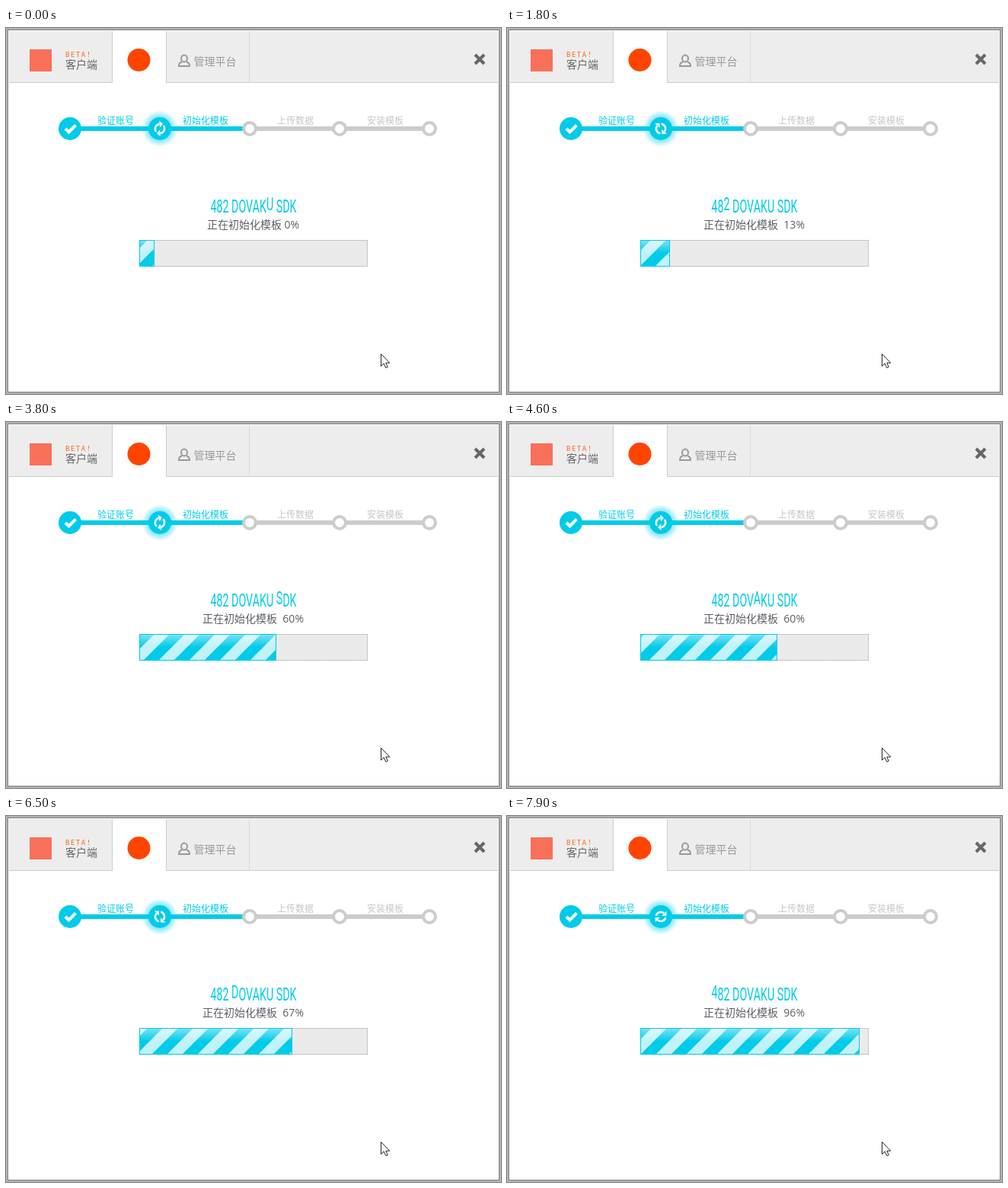
An HTML page for the animation above (8000 ms loop, 650 by 480 pixels).

```html
<!DOCTYPE html>
<html lang="zh">
<head>
<meta charset="utf-8">
<title>Setup progress</title>
<style>
  html, body { margin: 0; width: 100%; height: 100%; overflow: hidden; background: #b2b2b2; }
  svg { display: block; }
  text { font-family: "Open Sans", "Noto Sans CJK SC", "Noto Sans CJK", sans-serif; font-size: 14px; white-space: pre; }
  .mid { text-anchor: middle; }
  .step { font-size: 12px; }
  .cyan { fill: #00cbe9; }
  .off { fill: #c6c6c6; }
  .beta { font: 9px "DejaVu Sans Mono", monospace; letter-spacing: 1.5px; fill: #ff6a1f; }
  .title { font: 400 23px Roboto, sans-serif; }
</style>
</head>
<body>
<svg width="650" height="480" viewBox="0 0 650 480">
  <defs>
    <radialGradient id="glow">
      <stop offset=".6" stop-color="#00cbe9" stop-opacity=".5"/>
      <stop offset="1" stop-color="#00cbe9" stop-opacity="0"/>
    </radialGradient>
    <linearGradient id="gloss" x2="0" y2="1">
      <stop offset="0" stop-color="#7ce2f3"/>
      <stop offset=".5" stop-color="#00cbe9"/>
    </linearGradient>
    <pattern id="dots" width="2" height="2" patternUnits="userSpaceOnUse">
      <rect width="2" height="2" fill="#f7f7f7"/>
      <path d="M0 0h1v1h-1zM1 1h1v1h-1z" fill="#dedede"/>
    </pattern>
    <pattern id="stripes" width="40" height="33" patternUnits="userSpaceOnUse">
      <path d="M0 33L33 0H53L20 33zM-40 33L-7 0H13L-20 33z" fill="#fff" fill-opacity=".75"/>
    </pattern>
    <path id="arrow" d="M-6.2 -1.2A6.3 6.3 0 0 1 4.2 -4.4" fill="none" stroke="#fff" stroke-width="2.5"/>
    <path id="head" d="M7.4 -7.2V-1H1.2z" fill="#fff"/>
  </defs>

  <!-- window -->
  <rect x="2.5" y="2.5" width="645" height="475" fill="#fff" stroke="#808080"/>
  <rect x="4" y="4" width="642" height="67" fill="#ededed"/>
  <path d="M4 71.5H646M139.5 4V72M210.5 4V72" stroke="#ccc"/>
  <path d="M319.5 4V71" stroke="#d9d9d9"/>
  <rect x="140" y="4" width="70" height="69" fill="#fff"/>

  <!-- header -->
  <rect x="31" y="28" width="29" height="29" fill="#f9705a"/>
  <text class="beta" x="78" y="38">BETA!</text>
  <text x="78" y="53" fill="#666">客户端</text>
  <circle cx="174.5" cy="42" r="15" fill="#ff4400"/>
  <g fill="none" stroke="#999" stroke-width="2">
    <ellipse cx="234" cy="40" rx="4" ry="4.5"/>
    <path d="M231 44.5C228 45 227 46.5 227 50H241C241 46.5 240 45 237 44.5"/>
  </g>
  <text x="246.5" y="49" fill="#999">管理平台</text>
  <path d="M616 35L628 47M628 35L616 47" stroke="#666" stroke-width="4"/>

  <!-- steps -->
  <rect x="84" y="129" width="236" height="6" class="cyan"/>
  <rect x="320" y="129" width="236" height="6" fill="#ccc"/>
  <circle cx="202" cy="132" r="24" fill="url(#glow)"/>
  <circle cx="84" cy="132" r="15" class="cyan"/>
  <circle cx="202" cy="132" r="15" class="cyan"/>
  <path d="M78 132L82.5 136.5L91.5 127.5" fill="none" stroke="#fff" stroke-width="4"/>
  <g fill="#fff" stroke="#ccc" stroke-width="4">
    <circle cx="320" cy="132" r="8"/>
    <circle cx="438" cy="132" r="8"/>
    <circle cx="556" cy="132" r="8"/>
  </g>
  <g id="sync">
    <use href="#arrow"/><use href="#head"/>
    <g transform="rotate(180)"><use href="#arrow"/><use href="#head"/></g>
  </g>
  <g class="mid">
    <text class="step cyan" x="144" y="126">验证账号</text>
    <text class="step cyan" x="262" y="126">初始化模板</text>
    <text class="step off" x="380" y="126">上传数据</text>
    <text class="step off" x="498" y="126">安装模板</text>
  </g>

  <!-- progress -->
  <g transform="translate(325 241.5) scale(.62 1)">
    <text id="title" class="title mid cyan">482 DOVAKU SDK</text>
  </g>
  <text id="label" class="mid" x="324.5" y="263" fill="#5c5f66"></text>
  <rect x="175.5" y="278.5" width="299" height="34" fill="url(#dots)" stroke="#c4c4c4"/>
  <rect id="fill" x="175.5" y="278.5" height="34" stroke="#00cbe9"/>
  <rect id="bands" x="176" y="279" height="33" fill="url(#stripes)"/>

  <!-- pointer -->
  <path d="M492.5 427.5V443.5L496.2 440L498.8 445.7L501.3 444.6L498.8 439.2H503.8z" fill="#fff" stroke="#22222c"/>
</svg>
<script>
  const $ = id => document.getElementById(id);
  const set = (id, attrs) => {
    for (const k in attrs) $(id).setAttribute(k, attrs[k]);
  };

  // Tracks of [tick, value] pairs, linear in between; one tick is 100 ms.
  const hop = [[0, 8], [3, 12], [18, 26], [30, 37], [46, 54], [54, 62], [65, 75], [79, 84]];
  const spin = [[0, 130], [18, 445], [30, 650], [46, 1030], [54, 1275], [65, 1530], [79, 1800]];
  const slide = [[0, 112], [18, 75], [46, 27], [54, 3], [65, -28], [79, -44]];
  const load = [[0, 0], [11, 0], [18, 13], [30, 36.9], [36, 60], [63, 60], [65, 67], [72, 80], [79, 96]];

  function at(track, tick) {
    const i = Math.max(1, track.findIndex(p => p[0] >= tick));
    const [t0, v0] = track[i - 1], [t1, v1] = track[i];
    return v0 + (v1 - v0) * (tick - t0) / (t1 - t0);
  }

  const title = $('title').textContent;
  const letters = [...title].map((c, i) => i).filter(i => title[i] !== ' ');

  function draw(tick) {
    const raised = letters[Math.floor(at(hop, tick) + 1e-6) % letters.length];
    const dy = [...title].map((c, i) => i === raised ? -3 : i === raised + 1 ? 3 : 0);
    set('title', { dy: dy.join(' ') });
    set('sync', { transform: `translate(202 132) rotate(${at(spin, tick)})` });

    const done = at(load, tick);
    const percent = Math.floor(done + 1e-6);
    const width = Math.max(20, Math.round(done * 3));
    const blank = tick >= 29 && tick <= 31;
    $('label').textContent = '正在初始化模板' + (percent < 10 ? ' ' : '  ') + percent + '%';
    set('fill', { width: width - 1, fill: blank ? '#efefef' : 'url(#gloss)' });
    set('bands', { width: width - 2, visibility: blank ? 'hidden' : 'visible' });
    set('stripes', { patternTransform: `translate(${Math.round(at(slide, tick))} 279)` });
  }

  const start = performance.now();
  function frame() {
    draw(Math.floor((performance.now() - start) % 8000 / 100));
    requestAnimationFrame(frame);
  }
  frame();
</script>
</body>
</html>
```
